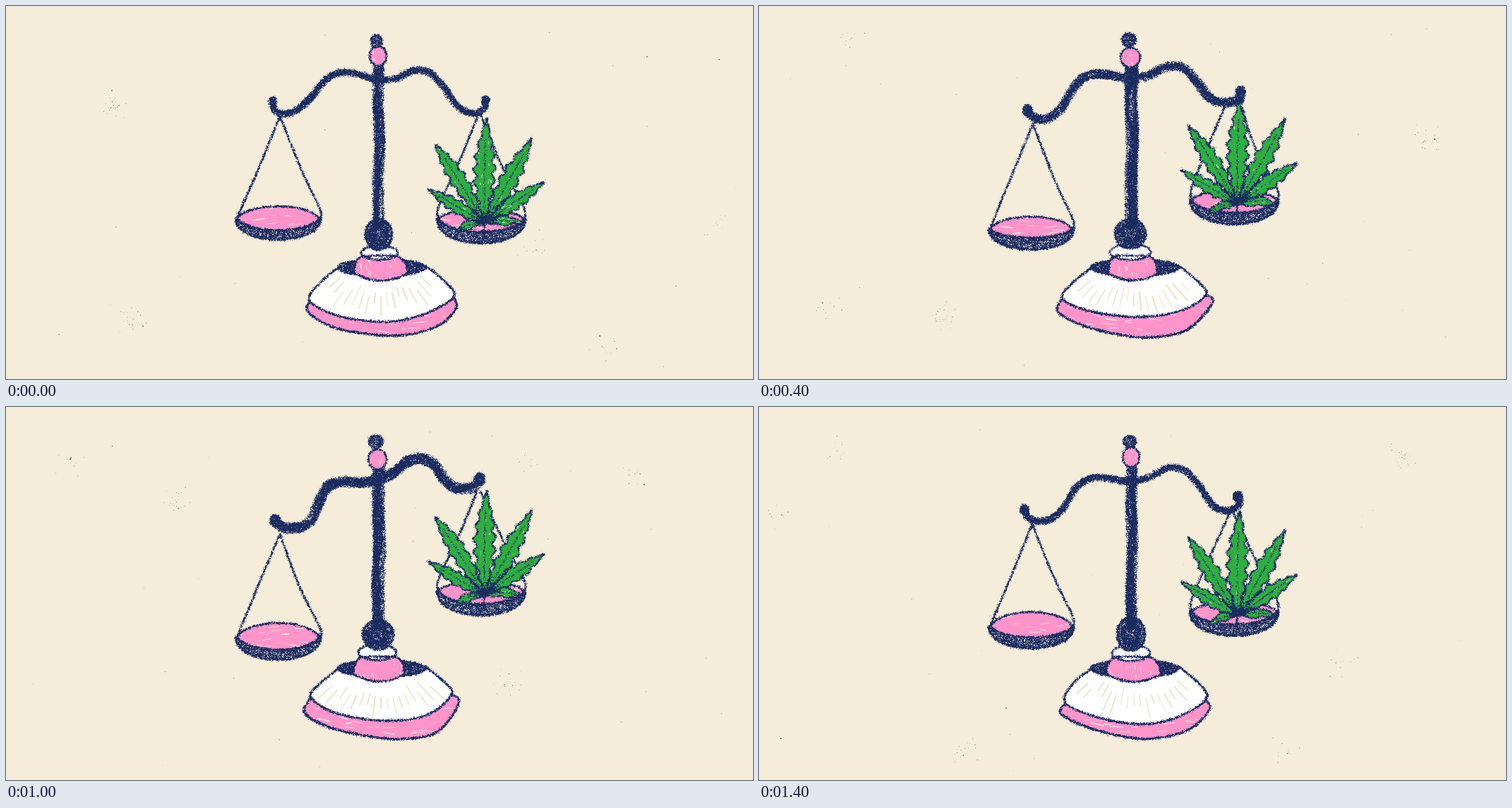
Animation of 1058 by 529 pixels, one loop 1.6 s. Source, as an HTML page with a canvas:

```html
<!DOCTYPE html>
<html lang="en">
<head>
<meta charset="utf-8">
<title>Scales</title>
<style>
  html, body { margin: 0; width: 100%; height: 100%; overflow: hidden; background: #f5ecd9; }
  canvas { display: block; width: 100%; height: 100%; }
</style>
</head>
<body>
<canvas id="stage" width="1058" height="529"></canvas>
<script>
const W = 1058, H = 529, BEAT = 200;
const CREAM = '#f5ecd9', NAVY = '#1a2b60', PINK = '#ff94cb', GREEN = '#2fae42', TAN = '#efe5cf';
const BOX = { x: 310, y: 30, w: 470, h: 450 };

// Five poses, from almost level to fully tipped. Ellipses are [x, y, rx, ry].
const level = {
  beam: [378,135, 380,147, 391,153, 408,150, 430,132, 454,104, 480,94, 505,99, 527,104, 552,103,
         575,92, 598,93, 618,112, 638,141, 661,152, 676,146, 679,134],
  thick: 11, curl: 6, hangL: [388,156], hangR: [668,156], panY: 301, lensY: 301, lens: 17, deep: 31, lift: 0,
  ball: [525,50,8,9], bead: [527,71,12,14], knob: [528,324,19,22], collar: [529,350,26,10], dome: [493,569],
  seam: [430,418, 472,440, 540,448, 592,437, 634,413], rim: [428,434, 462,455, 520,466, 570,466, 615,452, 638,428]
};
const slight = {
  beam: [376,146, 382,158, 396,162, 412,159, 430,145, 450,114, 475,100, 503,103, 527,105, 552,100,
         580,86, 604,91, 626,115, 644,141, 664,147, 681,138, 678,127],
  thick: 11, curl: 7, hangL: [387,166], hangR: [667,150], panY: 311, lensY: 308, lens: 18, deep: 32, lift: -12,
  ball: [525,49,9,8], bead: [527,71,12,14], knob: [527,322,20,24], collar: [527,349,27,11], dome: [492,569],
  seam: [434,420, 480,440, 540,450, 590,441, 633,415], rim: [427,434, 462,453, 520,468, 560,470, 610,457, 638,429]
};
const half = {
  beam: [380,148, 389,158, 407,160, 427,147, 445,117, 464,99, 490,97, 527,103, 553,98,
         575,87, 600,87, 619,105, 639,131, 661,137, 681,132, 682,121],
  thick: 14, curl: 7, hangL: [388,167], hangR: [659,145], panY: 316, lensY: 313, lens: 15, deep: 30, lift: -27,
  ball: [524,48,10,9], bead: [526,73,14,14], knob: [526,323,22,21], collar: [526,349,29,11], dome: [495,564],
  seam: [430,415, 470,433, 540,441, 598,432, 633,410], rim: [423,433, 458,453, 515,467, 556,470, 603,461, 630,438, 643,417]
};
const steep = {
  beam: [381,161, 393,171, 413,171, 432,160, 445,131, 458,111, 480,106, 505,107, 527,103, 550,93,
         570,77, 590,73, 607,82, 622,104, 640,115, 661,114, 671,102],
  thick: 16, curl: 8, hangL: [388,180], hangR: [667,120], panY: 326, lensY: 325, lens: 19, deep: 33, lift: -41,
  ball: [524,49,10,9], bead: [526,74,13,14], knob: [527,323,22,21], collar: [526,348,27,11], dome: [492,564],
  seam: [432,412, 470,435, 540,445, 598,436, 631,408], rim: [423,434, 460,455, 520,468, 560,471, 605,464, 630,441, 642,416]
};
const tipped = {
  beam: [379,167, 388,176, 408,169, 429,147, 447,116, 465,101, 495,100, 527,103, 550,92,
         570,78, 590,74, 612,86, 635,102, 655,104, 669,98, 668,87],
  thick: 17, curl: 9, hangL: [385,186], hangR: [662,108], panY: 335, lensY: 332, lens: 18, deep: 29, lift: -54,
  ball: [527,48,10,9], bead: [528,71,12,13], knob: [528,326,20,20], collar: [528,349,26,11], dome: [495,568],
  seam: [430,418, 472,438, 535,448, 592,437, 634,413], rim: [427,434, 462,454, 520,466, 570,465, 612,452, 640,427]
};
const poses = [level, slight, half, steep, tipped];
const cycle = [0, 1, 2, 3, 4, 3, 2, 1];

// Centres of the dust clusters on each beat.
const dust = [
  [150,140, 180,445, 845,488, 1000,315, 745,335],
  [90,110, 330,480, 900,90, 960,400],
  [945,185, 260,440, 130,45, 95,430],
  [200,48, 20,420, 185,485, 825,140, 695,32],
  [270,160, 820,255, 882,470, 455,195, 495,230],
  [712,392, 240,133, 92,80, 740,75, 885,100],
  [130,300, 290,70, 850,440, 930,150],
  [910,68, 295,490, 830,360, 110,60, 20,155, 745,490]
];

function seeded(s) {
  return () => {
    s = s + 0x6D2B79F5 | 0;
    let t = Math.imul(s ^ s >>> 15, 1 | s);
    t = t + Math.imul(t ^ t >>> 7, 61 | t) ^ t;
    return ((t ^ t >>> 14) >>> 0) / 4294967296;
  };
}

function sheet() {
  const c = document.createElement('canvas');
  c.width = W; c.height = H;
  return c.getContext('2d', { willReadFrequently: true });
}

const pen = sheet(), soft = sheet();

// Paper grain: fine noise over slightly coarser noise.
const grain = (() => {
  const r = seeded(7), cols = BOX.w / 2;
  const coarse = Array.from({ length: cols * BOX.h / 2 }, r);
  return Float32Array.from({ length: BOX.w * BOX.h }, (_, i) => {
    const x = i % BOX.w, y = i / BOX.w | 0;
    return 0.65 * r() + 0.35 * coarse[(y >> 1) * cols + (x >> 1)];
  });
})();

// Draws navy marks and lets the grain eat into them like crayon.
function crayon(g, shift, draw) {
  const { x, y, w, h } = BOX;
  pen.clearRect(0, 0, W, H);
  pen.strokeStyle = pen.fillStyle = NAVY;
  pen.lineCap = pen.lineJoin = 'round';
  draw(pen);
  pen.globalAlpha = 1;
  soft.clearRect(0, 0, W, H);
  soft.filter = 'blur(0.8px)';
  soft.drawImage(pen.canvas, 0, 0);
  soft.filter = 'none';
  const img = soft.getImageData(x, y, w, h), d = img.data;
  for (let i = 0; i < grain.length; i++) {
    const a = d[i * 4 + 3] / 255;
    if (!a) continue;
    const v = (a - grain[(i + shift) % grain.length]) * 3 + 0.35;
    d[i * 4] = 26; d[i * 4 + 1] = 43; d[i * 4 + 2] = 96;
    d[i * 4 + 3] = 255 * Math.max(0, Math.min(1, v));
  }
  soft.putImageData(img, x, y);
  g.drawImage(soft.canvas, x, y, w, h, x, y, w, h);
}

function smooth(flat, jitter = () => 0) {
  const p = [];
  for (let i = 0; i < flat.length; i += 2) p.push([flat[i] + jitter(), flat[i + 1] + jitter()]);
  const path = new Path2D(), at = i => p[Math.max(0, Math.min(p.length - 1, i))];
  path.moveTo(...p[0]);
  for (let i = 0; i < p.length - 1; i++) {
    const a = at(i - 1), b = p[i], c = p[i + 1], d = at(i + 2);
    path.bezierCurveTo(b[0] + (c[0] - a[0]) / 6, b[1] + (c[1] - a[1]) / 6,
                       c[0] - (d[0] - b[0]) / 6, c[1] - (d[1] - b[1]) / 6, c[0], c[1]);
  }
  return path;
}

function oval([x, y, rx, ry]) {
  const p = new Path2D();
  p.ellipse(x, y, rx, ry, 0, 0, Math.PI * 2);
  return p;
}

function fill(g, path, color) { g.fillStyle = color; g.fill(path); }

function stroke(g, path, width, alpha = 1) {
  g.globalAlpha = alpha;
  g.lineWidth = width;
  g.stroke(path);
}

function shade(g, path, alpha) {
  g.globalAlpha = alpha;
  g.fill(path);
  stroke(g, path, 3);
}

// A thick limb built from several loose strands.
function limb(g, pts, width, r) {
  stroke(g, smooth(pts), width, 0.68);
  for (let i = 0; i < 6; i++) {
    stroke(g, smooth(pts, () => (r() - 0.5) * width * 0.75), width * 0.2, 0.95);
  }
}

// Short pale gaps left in a coloured area.
function gaps(g, path, [x, y, w, h], n, len, tilt, r, color = CREAM) {
  g.save();
  g.clip(path);
  g.strokeStyle = color;
  g.lineCap = 'round';
  for (let i = 0; i < n; i++) {
    const px = x + r() * w, py = y + r() * h, l = len * (0.3 + r()), a = tilt + (r() - 0.5) * 0.4;
    g.globalAlpha = 0.4 + r() * 0.5;
    g.lineWidth = 0.7 + r() * 1.3;
    g.beginPath();
    g.moveTo(px, py);
    g.lineTo(px + Math.cos(a) * l, py + Math.sin(a) * l);
    g.stroke();
  }
  g.restore();
}

function pan(left, right, y, lensY, lens, deep) {
  const k = lens / 0.75, b = deep * 1.32, i = (right - left) * 0.16;
  const top = `M${left + 2},${y} C${left + i},${lensY - k} ${right - i},${lensY - k} ${right - 2},${y}`;
  const front = `C${right - i},${lensY + k} ${left + i},${lensY + k} ${left + 2},${y}`;
  return {
    lens: new Path2D(top + front + 'Z'),
    bowl: new Path2D(`M${left},${y} C${left},${y + b} ${right},${y + b} ${right},${y} ${front} Z`),
    box: [left, lensY - lens, right - left, lens * 2]
  };
}

const ROOT = [678, 308];

function leaflet(tx, ty, cx, cy, wide, waves, phase) {
  const edge = [[], []], vein = [], n = 48;
  for (let i = 0; i <= n; i++) {
    const t = i / n, u = 1 - t;
    const x = u * u * ROOT[0] + 2 * u * t * cx + t * t * tx;
    const y = u * u * ROOT[1] + 2 * u * t * cy + t * t * ty;
    const dx = u * (cx - ROOT[0]) + t * (tx - cx), dy = u * (cy - ROOT[1]) + t * (ty - cy);
    const l = Math.hypot(dx, dy) || 1;
    vein.push(x, y);
    [1, -1].forEach((side, k) => {
      const ripple = 1 + 0.24 * Math.sin(t * waves * 6.283 + phase + k);
      const w = side * (wide * Math.sin(Math.PI * t) ** 1.1 * ripple + 0.6);
      edge[k].push([x - dy / l * w, y + dx / l * w]);
    });
  }
  const shape = new Path2D();
  edge[0].concat(edge[1].reverse()).forEach(([x, y], i) => i ? shape.lineTo(x, y) : shape.moveTo(x, y));
  shape.closePath();
  return { shape, vein: smooth(vein.slice(0, 80)), tilt: Math.atan2(ty - ROOT[1], tx - ROOT[0]),
           box: [Math.min(tx, 668), Math.min(ty, 300), Math.abs(tx - 678) + 20, Math.abs(ty - 308) + 10] };
}

function leaf(phase) {
  return [
    [637, 321, 655, 306, 5, 2], [731, 308, 705, 300, 6, 2],
    [598, 260, 640, 285, 8, 6], [762, 250, 722, 276, 9, 6],
    [608, 197, 637, 238, 10, 7], [745, 187, 714, 245, 11, 7],
    [681, 160, 676, 235, 13, 8]
  ].map((a, i) => leaflet(...a, phase + i));
}

function drawPose(p, k) {
  const g = sheet(), r = seeded(40 + k), up = p.lift;
  const left = pan(325, 446, p.panY, p.lensY, p.lens, p.deep);
  const right = pan(610, 736, 302 + up, 305 + up, 16, 35);
  const outer = smooth([...p.seam.slice(0, 2), ...p.rim, ...p.seam.slice(-2)]);
  const body = smooth([472,370, 444,393, ...p.seam, 623,392, 594,368]);
  const hole = oval([532, 371, 62, 12]);

  fill(g, outer, PINK);
  gaps(g, outer, [430, 425, 205, 40], 24, 14, 0.1, r);
  fill(g, body, '#fff');
  g.lineCap = 'round';
  g.strokeStyle = TAN;
  for (let i = 0; i < 17; i++) {
    const f = i / 16 * 2 - 1, s = 0.1 + r() * 0.35, e = s + 0.25 + r() * 0.35;
    const at = t => [531 + f * (52 + 42 * t), 394 - 14 * f * f + t * (50 - 12 * f * f)];
    g.lineWidth = 1 + r() * 1.5;
    g.beginPath();
    g.moveTo(...at(s));
    g.lineTo(...at(e));
    g.stroke();
  }
  for (const q of [left, right]) {
    fill(g, q.lens, PINK);
    gaps(g, q.lens, q.box, 16, 13, 0, r);
  }

  crayon(g, k * 9173, c => {
    stroke(c, outer, 3.6);
    stroke(c, body, 3.4);
    shade(c, hole, 0.9);
    const [lx, ly] = p.hangL, [rx, ry] = p.hangR;
    const bow = () => (r() - 0.5) * 3;
    for (const s of [
      [lx, ly, (lx + 328) / 2 + bow(), (ly + p.panY) / 2, 328, p.panY - 2],
      [lx, ly, (lx + 444) / 2 + bow(), (ly + p.panY) / 2, 445, p.panY - 12, 444, p.panY],
      [rx, ry, (rx + 615) / 2 + bow(), (ry + 282 + up) / 2, 613, 284 + up, 612, 302 + up],
      [rx + (k === 2 ? 25 : 5), ry, 702, 226 + up, 733, 284 + up, 735, 302 + up]
    ]) stroke(c, smooth(s), 3.2, 0.95);
    for (const q of [left, right]) {
      shade(c, q.bowl, 0.76);
      stroke(c, q.lens, 3.2);
    }
    limb(c, p.beam, p.thick, r);
    const b = p.beam;
    for (const [x, y] of [b.slice(0, 2), b.slice(-2)]) shade(c, oval([x, y, p.curl - 1, p.curl]), 0.85);
    limb(c, [528,88, 527,140, 529,195, 527,250, 528,308], 17 + (k > 1 ? 2 : 0), r);
  });

  const [dl, dr] = p.dome;
  const dome = new Path2D(`M${dl},379 C${dl},362 500,354 508,354 L548,354 C558,354 ${dr},362 ${dr},379 Q531,400 ${dl},379Z`);
  const bead = oval(p.bead), collar = oval(p.collar);
  fill(g, dome, PINK);
  gaps(g, dome, [dl, 358, 76, 32], 16, 6, 1.4, r);
  fill(g, collar, '#fff');
  fill(g, bead, PINK);
  gaps(g, bead, [515, 60, 22, 24], 7, 5, 1.2, r);

  crayon(g, k * 7411 + 3000, c => {
    stroke(c, dome, 3.2);
    stroke(c, collar, 3);
    stroke(c, bead, 3);
    shade(c, oval(p.ball), 0.8);
    shade(c, oval(p.knob), 0.8);
    stroke(c, oval(p.knob.map((v, i) => i > 1 ? v * 0.55 : v)), 7, 0.9);
  });

  const parts = leaf(k * 1.7);
  g.save();
  g.translate(0, up);
  for (const q of parts) {
    fill(g, q.shape, GREEN);
    gaps(g, q.shape, q.box, k ? 9 : 22, 5, q.tilt, r, '#d9e6c0');
  }
  g.restore();
  crayon(g, k * 5309 + 800, c => {
    c.save();
    c.translate(0, up);
    for (const q of parts) {
      stroke(c, q.shape, 2.7, 0.95);
      stroke(c, q.vein, 2, 0.8);
    }
    stroke(c, smooth([678,306, 677,316, 678,329]), 3);
    c.restore();
  });
  return g.canvas;
}

function drawDust(spots, k) {
  const g = sheet(), r = seeded(900 + k);
  g.fillStyle = NAVY;
  const dot = (x, y) => {
    const s = r() < 0.12 ? 2 : 1;
    g.globalAlpha = 0.15 + r() * r() * 0.6;
    g.fillRect(Math.round(x), Math.round(y), s, s);
  };
  for (let i = 0; i < spots.length; i += 2) {
    const n = i < 4 ? 24 : 11;
    for (let j = 0; j < n; j++) dot(spots[i] + (r() + r() - 1) * 24, spots[i + 1] + (r() + r() - 1) * 24);
  }
  for (let i = 0; i < 26; i++) dot(20 + r() * 1015, 20 + r() * 495);
  return g.canvas;
}

const drawings = poses.map(drawPose), specks = dust.map(drawDust);
const stage = document.getElementById('stage').getContext('2d');
let shown = -1;

function tick() {
  const beat = Math.floor(performance.now() / BEAT) % cycle.length;
  if (beat !== shown) {
    shown = beat;
    stage.fillStyle = CREAM;
    stage.fillRect(0, 0, W, H);
    stage.drawImage(specks[beat], 0, 0);
    stage.drawImage(drawings[cycle[beat]], 0, 0);
  }
  requestAnimationFrame(tick);
}
tick();
</script>
</body>
</html>
```
